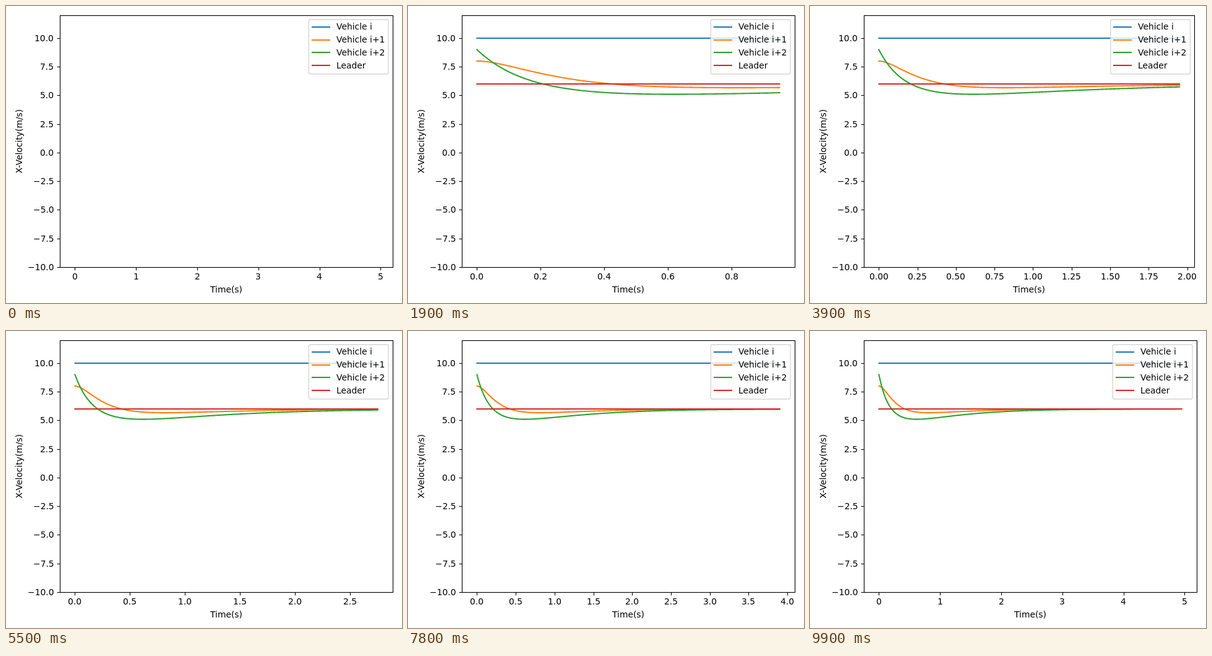
Write an HTML page with a canvas that moves like this. It is 640 px wide and 480 px high and loops after 10000 ms.

```html
<!DOCTYPE html>
<html lang="en">
<head>
<meta charset="utf-8">
<title>Velocity over time</title>
<style>
  html, body { margin: 0; width: 100%; height: 100%; overflow: hidden; background: #fff; }
  canvas { display: block; }
</style>
</head>
<body>
<canvas id="stage" width="640" height="480"></canvas>
<script>
const ctx = document.getElementById('stage').getContext('2d');
const FRAME_MS = 100, FRAMES = 100, DT = 0.05;
const LEFT = 87, RIGHT = 625, TOP = 15, BOTTOM = 421.9;
const Y_MIN = -10, Y_MAX = 12;
const TICK = 4.86, THIN = 1.11, THICK = 2.08;

// Each term [a, k] adds a * exp(-k * t) to the settled speed.
const decay = (base, ...terms) => t =>
  terms.reduce((v, [a, k]) => v + a * Math.exp(-k * t), base);

const series = [
  { name: 'Vehicle i', color: '#1f77b4', speed: decay(10), flat: true },
  { name: 'Vehicle i+1', color: '#ff7f0e', speed: decay(6, [-1.36, 1.3], [5.414, 4.5], [-2.054, 11]) },
  { name: 'Vehicle i+2', color: '#2ca02c', speed: decay(6, [-3.4, 1.3], [3.8, 3], [2.6, 7.47]) },
  { name: 'Leader', color: '#d62728', speed: decay(6), flat: true }
];

const snap = v => Math.round(v) + 0.5;
const yPos = v => BOTTOM - (v - Y_MIN) / (Y_MAX - Y_MIN) * (BOTTOM - TOP);
const textWidth = s => ctx.measureText(s).width;

function line(points, color, width) {
  ctx.beginPath();
  points.forEach(([x, y]) => ctx.lineTo(x, y));
  ctx.strokeStyle = color;
  ctx.lineWidth = width;
  ctx.stroke();
}

// align: 0 = left, 0.5 = centre, 1 = right
function text(s, x, y, align = 0) {
  ctx.fillStyle = '#000';
  ctx.fillText(s, Math.round(x - align * textWidth(s)), Math.round(y));
}

// Round tick step giving at most nine intervals over the padded span.
function xTicks(span) {
  const raw = span * 1.1 / 9;
  const power = 10 ** Math.floor(Math.log10(raw));
  const lead = [1, 2, 2.5, 5, 10].find(m => m * power >= raw);
  const step = lead * power;
  const digits = Math.max(0, -Math.floor(Math.log10(step) + 1e-9)) + (lead === 2.5 ? 1 : 0);
  const ticks = [];
  for (let i = 0; i * step <= span * 1.05 + 1e-9; i++) {
    ticks.push({ value: i * step, label: (i * step).toFixed(digits) });
  }
  return ticks;
}

function drawCurves(span, xPos) {
  ctx.lineJoin = 'round';
  for (const { color, speed, flat } of series) {
    const steps = flat ? 1 : Math.round(span / 0.005);
    const points = [];
    for (let i = 0; i <= steps; i++) {
      const t = span * i / steps, y = yPos(speed(t));
      points.push([xPos(t), flat ? Math.round(y) : y]);
    }
    line(points, color, THICK);
  }
}

function drawAxes(ticks, xPos, right) {
  ctx.lineJoin = 'miter';
  const base = snap(BOTTOM), side = snap(LEFT);
  ctx.strokeStyle = '#000';
  ctx.lineWidth = THIN;
  ctx.strokeRect(side, snap(TOP), snap(right) - side, base - snap(TOP));

  ctx.lineCap = 'butt';
  for (const { value, label } of ticks) {
    const x = snap(xPos(value));
    line([[x, base], [x, base + TICK]], '#000', THIN);
    text(label, xPos(value), 442, 0.5);
  }
  for (let v = -10; v <= 10; v += 2.5) {
    const y = yPos(v);
    line([[side, snap(y)], [side - TICK, snap(y)]], '#000', THIN);
    text(v.toFixed(1).replace('-', '\u2212'), 77.3, Math.round(y) + 5, 1);
  }

  text('Time(s)', (LEFT + right) / 2, 463, 0.5);
  ctx.save();
  ctx.translate(26, (TOP + BOTTOM) / 2);
  ctx.rotate(-Math.PI / 2);
  text('X-Velocity(m/s)', 0, 0, 0.5);
  ctx.restore();
}

function drawLegend(right) {
  ctx.beginPath();
  ctx.roundRect(right - 135.7, 21.94, 128.76, 88.1, 2.78);
  ctx.fillStyle = 'rgba(255,255,255,0.8)';
  ctx.fill();
  ctx.strokeStyle = 'rgba(204,204,204,0.8)';
  ctx.lineWidth = 1.39;
  ctx.stroke();

  ctx.lineCap = 'square';
  series.forEach(({ name, color }, i) => {
    const y = Math.round(33.6 + 20.94 * i);
    const x = Math.round(right - 130);
    line([[x, y], [x + 28, y]], color, THICK);
    text(name, right - 91, 38 + 21 * i);
  });
}

function draw(index) {
  const span = DT * (index || FRAMES - 1);
  const ticks = xTicks(span);
  const scale = right => t => LEFT + (right - LEFT) * (t / span + 0.05) / 1.1;

  ctx.font = '13.89px "DejaVu Sans", Verdana, sans-serif';
  // The plot narrows when the last tick label would stick out.
  const last = ticks[ticks.length - 1];
  const overflow = scale(RIGHT)(last.value) + textWidth(last.label) / 2 - RIGHT;
  const right = RIGHT - Math.max(0, overflow);
  const xPos = scale(right);

  ctx.fillStyle = '#fff';
  ctx.fillRect(0, 0, 640, 480);
  ctx.lineCap = 'square';
  if (index) drawCurves(span, xPos);
  drawAxes(ticks, xPos, right);
  drawLegend(right);
}

const start = performance.now();
function tick() {
  const elapsed = Math.max(0, performance.now() - start);
  draw(Math.floor(elapsed / FRAME_MS) % FRAMES);
  requestAnimationFrame(tick);
}
tick();
</script>
</body>
</html>
```
